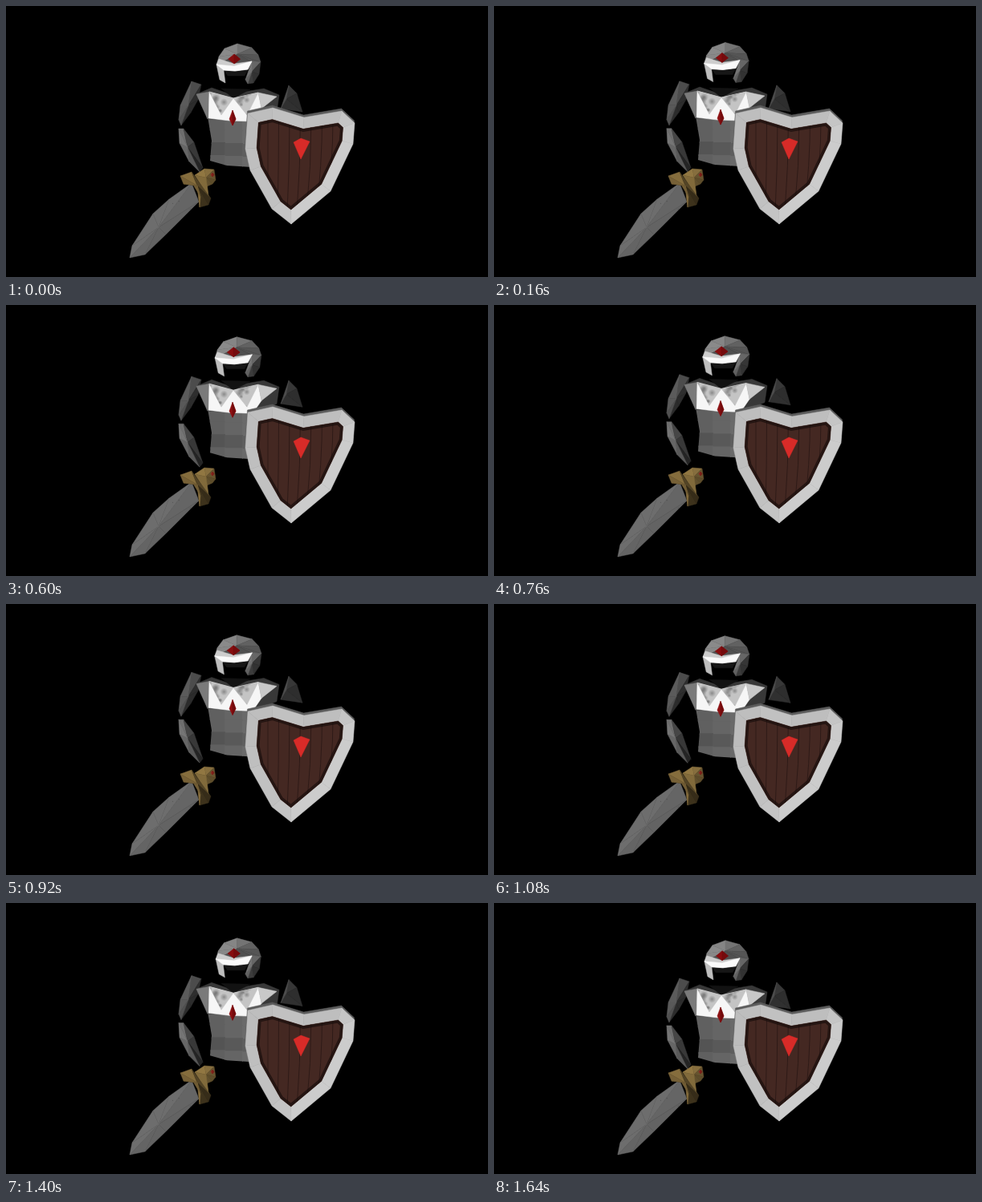
These frames come from a looping animation (600x338 px, 1680 ms). An HTML page with a canvas:

```html
<!DOCTYPE html>
<html lang="en">
<head>
<meta charset="utf-8">
<title>Floating armour</title>
<style>
html, body { margin: 0; width: 100%; height: 100%; overflow: hidden; background: #000; }
canvas { display: block; width: 600px; height: 338px; }
</style>
</head>
<body>
<canvas id="stage" width="600" height="338"></canvas>
<script>
const ctx = document.getElementById('stage').getContext('2d');
const LOOP = 1680, STEP = 40;

const points = text => text.split(' ').map(pair => pair.split(',').map(Number));
const gray = tone => `rgb(${tone},${tone},${tone})`;
const gold = tone => `rgb(${tone},${tone * 0.82},${tone * 0.46})`;

function trace(shape) {
  ctx.beginPath();
  for (const p of shape) ctx.lineTo(...p);
  ctx.closePath();
}

function facet(color, shape) {
  trace(shape);
  ctx.fillStyle = ctx.strokeStyle = color;
  ctx.lineWidth = 0.5;
  ctx.fill();
  ctx.stroke();
}

// Outward unit normal of the edge that starts at corner i of a clockwise shape.
function normal(shape, i) {
  const n = shape.length;
  const [x0, y0] = shape[(i + n) % n], [x1, y1] = shape[(i + 1) % n];
  const length = Math.hypot(x1 - x0, y1 - y0);
  return [(y1 - y0) / length, (x0 - x1) / length];
}

// How far an edge faces the light at the upper left, from -1 to 1.
function facing(shape, i) {
  const [nx, ny] = normal(shape, i);
  return -0.8 * nx - 0.6 * ny;
}

function inset(shape, depth) {
  return shape.map(([x, y], i) => {
    const [ax, ay] = normal(shape, i - 1), [bx, by] = normal(shape, i);
    const k = depth / (1 + ax * bx + ay * by);
    return [x - k * (ax + bx), y - k * (ay + by)];
  });
}

// A faceted solid: triangles from each edge to one ridge point.
function shard(shape, ridge, tone, contrast, tint = gray) {
  shape.forEach((p, i) => {
    const next = shape[(i + 1) % shape.length];
    facet(tint(tone + contrast * facing(shape, i)), [p, next, ridge]);
  });
}

function gem(x, y, w, h, shoulder, color, shade) {
  const top = [x, y], bottom = [x, y + h];
  const left = [x - w, y + h * shoulder], right = [x + w, y + h * shoulder];
  facet(color, [top, right, bottom, left]);
  facet(shade, [top, right, bottom]);
}

function clipped(shape, draw) {
  ctx.save();
  trace(shape);
  ctx.clip();
  draw();
  ctx.restore();
}

function scuffs(shape, count, size, seed) {
  const random = () => (seed = seed * 16807 % 2147483647) / 2147483647;
  const xs = shape.map(p => p[0]), ys = shape.map(p => p[1]);
  const within = list => Math.min(...list) + random() * (Math.max(...list) - Math.min(...list));
  clipped(shape, () => {
    for (let i = 0; i < count; i++) {
      const x = within(xs), y = within(ys), r = size * (0.5 + random());
      const g = ctx.createRadialGradient(x, y, 0, x, y, r);
      g.addColorStop(0, 'rgba(50,50,50,.4)');
      g.addColorStop(1, 'rgba(50,50,50,0)');
      ctx.fillStyle = g;
      ctx.fillRect(x - r, y - r, 2 * r, 2 * r);
    }
  });
}

function raised(dy, draw) {
  ctx.save();
  ctx.translate(0, -dy);
  draw();
  ctx.restore();
}

function shoulders() {
  shard(points('231,94 243,98 239,117 230,133 218,149 215,142 217,124'), [227, 124], 68, 24);
  shard(points('352,99 362,109 369,132 342,128'), [349, 116], 58, 20);
}

function forearm() {
  shard(points('215,153 221,153 234,170 245,202 241,207 228,194 216,171'), [226, 176], 82, 46);
}

function belly() {
  const outline = points('251,138 311,138 306,201 275,199 254,193 256,168');
  clipped(outline, () => {
    for (let row = 0; row < 4; row++) {
      for (let col = 0; col < 3; col++) {
        ctx.fillStyle = gray(96 - (row === 2 ? 12 : 0) + col * 5);
        ctx.fillRect(250 + col * 22, 138 + row * 16 + col, 23, 18);
      }
    }
  });
}

function torso() {
  belly();
  facet(gray(56), points('237,110 256,102 279,110 321,103 340,111 337,132 311,143 251,141'));
  facet(gray(122), points('237,110 253,107 251,141'));
  facet(gray(18), points('268,103 304,104 283,115'));

  // White breastplate with a mottled panel on either side of its peak.
  const hem = points('252,140 278,143 307,144');
  const peak = [283, 115], left = [253, 107], right = [314, 108];
  facet(gray(246), [left, peak, right, [318, 128], hem[2], hem[1], hem[0]]);
  facet(gray(200), [right, [337, 113], [318, 128]]);
  [[left, [268, 136], 31], [right, [300, 136], 53]].forEach(([corner, low, seed]) => {
    const panel = corner === left ? [corner, peak, low] : [peak, corner, low];
    facet(gray(196), panel);
    scuffs(panel, 14, 4, seed);
  });
  gem(282, 130, 4, 19, 0.58, '#8c1012', '#740b0d');
}

function helm(pitch) {
  ctx.save();
  ctx.translate(300, -8.3 * pitch);
  ctx.scale(1 + 0.06 * pitch, 1);
  ctx.translate(-300, 0);
  shard(points('262,74 265,63 272,53 288,47 306,52 314,61 317,70 306,70 284,73'), [288, 60], 104, 34);
  facet(gray(22), points('270,78 302,78 297,87 276,87'));
  facet(gray(190), points('262,73 271,80 273,96 266,92'));
  shard(points('306,69 317,70 315,85 308,96 301,97 298,92'), [306, 82], 84, 34);

  const brow = points('262,73 265,66 284,72 306,69 301,79 285,81 271,80');
  facet(gray(205), brow);
  facet(gray(250), [brow[0], [284, 75], brow[3], ...brow.slice(4)]);
  gem(284, 60, 7.5, 12, 0.52, '#870d0f', '#740b0d');
  ctx.restore();
}

function sword() {
  const blade = points('231,221 240,244 199,285 173,310 154,314 157,299 183,259 203,241');
  shard(blade, [190, 276], 104, 5);
  scuffs(blade, 14, 1.4, 77);

  const guard = points('217,212 231,207 255,240 252,248 241,251 242,238 233,223 221,222');
  const grip = points('235,211 247,203 259,204 261,217 257,222 250,225 252,238');
  shard(grip, [249, 214], 120, 26, gold);
  shard(guard, [238, 224], 96, 44, gold);
  gem(257, 208, 2, 5, 0.5, '#8d2420', '#742019');
}

function shield() {
  const face = points('301,134 332,127 371,139 418,131 434,146 432,172 404,231 355,272 331,253 304,205 298,178');
  const board = inset(face, 14);
  facet(gray(92), face.map(([x, y]) => [x - 0.5, y - 3]));
  face.forEach((p, i) => {
    const j = (i + 1) % face.length;
    facet(gray(196 - 8 * facing(face, i)), [p, face[j], board[j], board[i]]);
  });

  facet('#442822', board);
  clipped(board, () => {
    ctx.strokeStyle = '#2e1a17';
    ctx.lineWidth = 1;
    for (let i = 0; i < 7; i++) {
      const x = 326 + i * 13.5;
      ctx.beginPath();
      ctx.moveTo(x, 140);
      ctx.quadraticCurveTo(x, 200, x - 1.5 * i, 258);
      ctx.stroke();
    }
    trace(board);
    ctx.strokeStyle = 'rgba(20,12,10,.65)';
    ctx.lineWidth = 7;
    ctx.stroke();
  });
  facet('#d82b28', points('358,170 367,165 378,169 367,191'));
}

function render(now) {
  const u = Math.floor(now % LOOP / STEP) * STEP / LOOP;
  const wave = Math.sin(Math.PI * u);
  const armLift = 9 * Math.sin(Math.PI * u ** 1.3) ** 2;
  ctx.fillStyle = '#000';
  ctx.fillRect(0, 0, 600, 338);
  raised(armLift, shoulders);
  raised(10.8 * wave ** 2, torso);
  helm(wave ** 1.4);
  raised(armLift, forearm);
  sword();
  shield();
}

const start = performance.now();
function tick() {
  render(performance.now() - start);
  requestAnimationFrame(tick);
}
tick();
</script>
</body>
</html>
```
